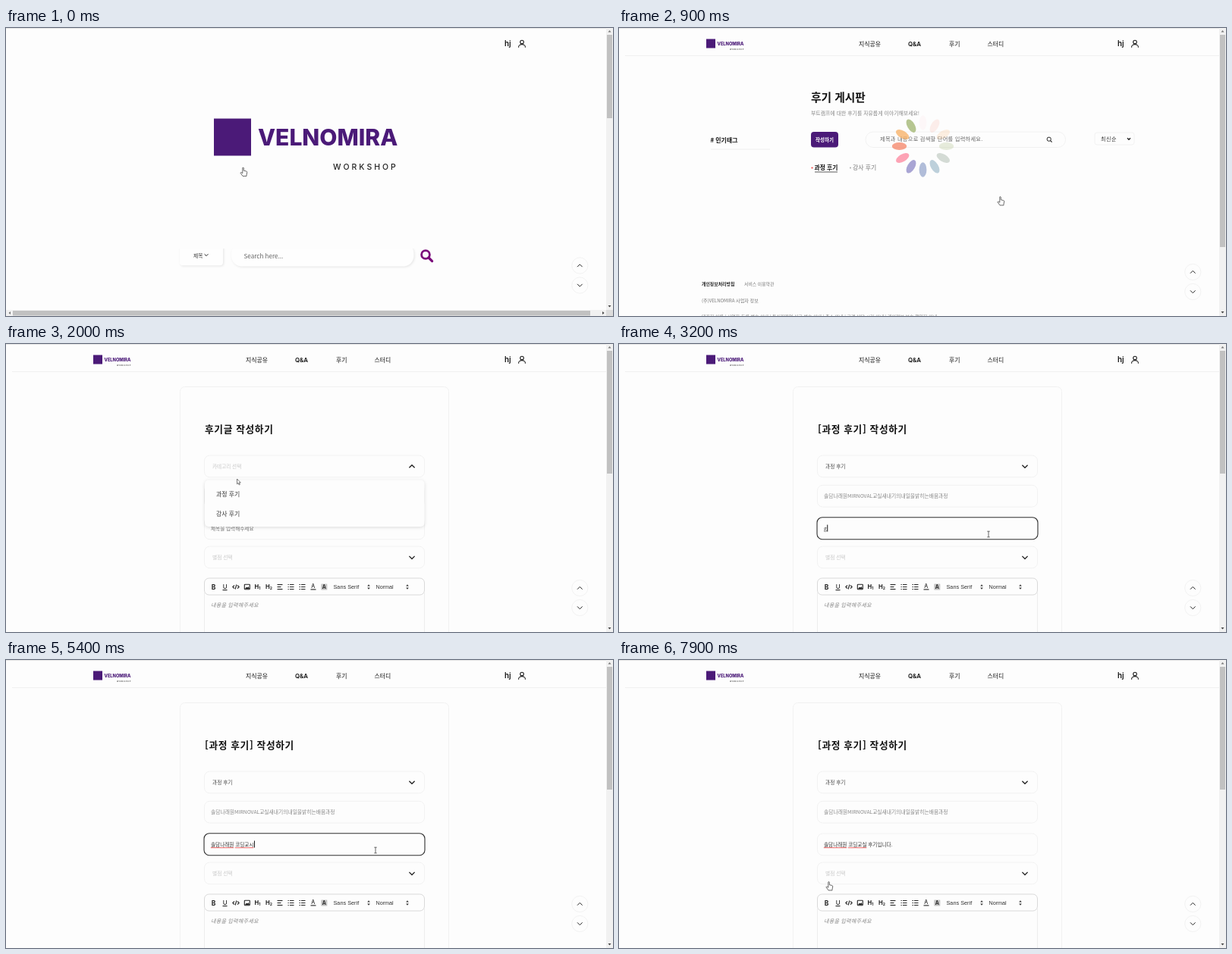
An HTML page for the animation above (8 s loop, 800 by 380 pixels).

```html
<!DOCTYPE html>
<html lang="ko">
<head>
<meta charset="utf-8">
<title>Review board</title>
<style>
html, body { margin: 0; width: 100%; height: 100%; overflow: hidden; background: #fdfdfd; }
svg { display: block; }
text { font-family: 'Noto Sans CJK KR', 'Noto Sans CJK', 'Noto Sans', sans-serif; white-space: pre; }
.latin { font-family: Inter, Roboto, sans-serif; }
.arial { font-family: 'Liberation Sans', Arial, sans-serif; }
.line { fill: none; stroke: #222; stroke-width: 1.1; }
.box { fill: #fdfdfd; stroke: #efefef; stroke-width: .8; }
.soft { fill: #fefefe; filter: drop-shadow(1px 1.5px 1.5px #00000018); }
.card { fill: #fdfdfd; stroke: #e8eef2; stroke-width: .8; filter: drop-shadow(0 1px 4px #b8d4e238); }
.wave { stroke: #e83030; stroke-width: 1; stroke-dasharray: 1.5 .5; }
</style>
</head>
<body>
<svg id="stage" width="800" height="380" viewBox="0 0 800 380"></svg>
<script>
const PURPLE = '#4b1a78', GREY = '#888', PALE = '#c8c8c8';
const BRAND = 'VELNOMIRA', TAG = 'WORKSHOP';
const COURSE = '솔담나래원MIRNOVAL교실새내기의내일을밝히는배움과정';
const TYPED = '솔담나래원 코딩교실 후기입니다.';
const PETALS = ['#fe718d', '#f47e60', '#f8b26a', '#abbd81', '#849b87', '#6492ac', '#637cb5', '#6a63b6'];

// Markup helpers
const text = (x, y, str, size, fill = '#222', weight = 400, extra = '') =>
  `<text x="${x}" y="${y}" font-size="${size}" fill="${fill}" font-weight="${weight}" ${extra}>${str}</text>`;
const rect = (x, y, w, h, r = 0, attrs = 'class="box"') =>
  `<rect x="${x}" y="${y}" width="${w}" height="${h}" rx="${r}" ${attrs}/>`;
const path = (d, attrs = 'class="line"') => `<path d="${d}" ${attrs}/>`;
const circle = (x, y, r, attrs = 'class="line"') => `<circle cx="${x}" cy="${y}" r="${r}" ${attrs}/>`;
const chevron = (x, y, w, dir, width = 1) =>
  path(`M${x - w} ${y - dir * w / 2}l${w} ${dir * w}l${w} ${-dir * w}`, `class="line" style="stroke-width:${width}"`);
const fill = color => `fill="${color}"`;
const latin = 'class="latin"', arial = 'class="arial"';
const spaced = n => `letter-spacing="${n}"`;

const account = text(657, 24, 'hj', 9.7, '#111', 600, latin) +
  circle(680, 18.6, 2.3) + path('M675.6 25.8v-.8a4.4 3.4 0 0 1 8.8 0v.8');

const pager = y => [[0, -1], [26, 1]].map(([dy, dir]) =>
  circle(756.3, y + dy, 10.6, 'class="box"') + chevron(756.3, y + dy, 3.3, dir)).join('');

const scrollbar = (height, thumb, id = '') =>
  rect(791, 0, 9, height, 0, fill('#f1f1f1')) +
  path('M793.5 5.5l2-2.5l2 2.5z', fill('#777')) +
  path(`M793.5 ${height - 6}l2 2.5l2 -2.5z`, fill('#444')) +
  rect(792, 9, 7, thumb, 0, fill('#c1c1c1') + id);

const topLine = path('M0 .5H800', 'stroke="#e6e6e6"');

const header = topLine + path('M8 36.5H791', 'stroke="#f0f0f0"') +
  rect(115, 14.5, 12, 12, 0, fill(PURPLE)) +
  text(129.5, 23, BRAND, 5.7, PURPLE, 800, latin) +
  text(146, 28.5, TAG, 2.4, '#333', 500, latin + spaced(.6)) +
  text(316, 24, '지식공유', 7.9, '#111', 500) +
  text(381, 24, 'Q&amp;A', 7.9, '#111', 600, latin) +
  text(435, 24, '후기', 7.9, '#111', 500) +
  text(485.5, 24, '스터디', 7.9, '#111', 500) + account;

// Landing page
const cardAt = (x, y, title, lines) => rect(x - 16.5, 457, 180, 200, 5, 'class="card"') +
  text(x, y, title, 11.9, '#111', 500) +
  lines.map((s, i) => text(x, y + 21.7 + i * 13.6, s, 9.95, GREY)).join('');

const bulb = path('M245 600v-12q0-5 6-5h7q2 4 6 5M259 590v-8h8M267 592h20l-3-9', 'class="line" style="stroke-width:1.8"') +
  circle(273, 581, 4.2, 'class="line" style="stroke-width:1.6"') +
  path('M273 573v2M266 576l2 1.5M280 576l-2 1.5M282 582h2M264 582h2M271 586v4h4v-4');
const star = x => path(`M${x} 583.5l1.4 2.8 3 .4-2.2 2.2.5 3-2.7-1.4-2.7 1.4.5-3-2.2-2.2 3-.4z`, fill('#111'));

const landing = `<g id="scroller">` +
  rect(274, 119.5, 49, 49, 0, fill(PURPLE)) +
  text(332, 155, BRAND, 30, PURPLE, 800, latin) +
  text(431, 187, TAG, 10.5, '#222', 500, latin + spaced(3)) +
  `<clipPath id="cut"><rect x="220" y="291" width="330" height="40"/></clipPath>
   <g clip-path="url(#cut)">${rect(229, 286, 57, 27.3, 4, 'class="soft"') + rect(297, 284, 240.5, 30.5, 14, 'class="soft"')}</g>` +
  text(247, 303, '제목', 6.7, '#333', 500) + chevron(264, 299.5, 2.4, 1) +
  text(313.5, 304, 'Search here...', 8.1, '#666') +
  circle(553, 299, 5.4, 'class="line" style="stroke:#7a0a7a;stroke-width:2.8"') +
  path('M557 303l4.6 4.6', 'stroke="#7a0a7a" stroke-width="3.2" stroke-linecap="round"') +
  cardAt(137.5, 529, '지식 공유 서비스', ['집단 지성이 참여하고', '토론할 수 있는 문화']) +
  cardAt(331, 522.3, '무엇이든 물어보세요', ['구성원이 서로 소통하며', '관심 분야에 대해', '자연스럽게 공유하는 환경 제공']) +
  cardAt(525, 522.3, '프로그램 참여 후기', ['실제 부트캠프에 참여한', '구성원들의 생생한 후기를', '공유하는 문화 형성']) +
  bulb + circle(459.5, 600, 18, 'class="line" style="stroke:#111;stroke-width:2.4"') +
  rect(637.5, 581.5, 36, 30, 1, 'class="line" style="stroke-width:1.6"') +
  [646, 655.5, 665].map(star).join('') + `</g>` +
  rect(0, 0, 791, 42, 0, fill('#fdfdfd')) + topLine + account + pager(313.5) +
  scrollbar(372, 110, 'id="thumb"') +
  rect(0, 372, 800, 8, 0, fill('#f1f1f1')) + rect(9, 373, 761, 6.5, 0, fill('#c1c1c1')) +
  path('M6 374l-2.5 2 2.5 2z', fill('#777')) + path('M786 374l2.5 2-2.5 2z', fill('#444')) +
  rect(791, 372, 9, 8, 0, fill('#dcdcdc'));

// Review board
const petals = Array.from({ length: 12 }, (_, k) =>
  `<ellipse class="petal" cy="-31" rx="4.9" ry="9.7" fill="${PETALS[k % 8]}" transform="rotate(${k * 30})"/>`).join('');

const board = header +
  text(253, 96.5, '후기 게시판', 14.7, '#111', 600) +
  text(253, 115, '부트캠프에 대한 후기를 자유롭게 이야기해보세요!', 6.9, GREY) +
  text(120.5, 150.5, '# 인기태그', 7.9, '#111', 600) + path('M121 160H199', 'stroke="#eee"') +
  rect(253, 137, 36, 20.5, 4, fill(PURPLE)) + text(259, 149.5, '작성하기', 6.5, '#fff', 600) +
  rect(325, 137, 263.5, 20.5, 10) +
  text(344, 149, '제목과 내용으로 검색할 단어를 입력하세요.', 7.2, '#666', 400, spaced(.28)) +
  circle(566.7, 146.7, 2.6, 'class="line" style="stroke-width:1"') + path('M568.6 148.6l2 2') +
  rect(627, 138, 52, 16, 3) + text(635, 148.7, '최신순', 7, '#333', 400, spaced(.6)) + chevron(672, 146.2, 2, 1, 1.4) +
  circle(254.5, 184.5, 1, fill('#e33')) + text(257.5, 187, '과정 후기', 7.8, '#111', 600) +
  path('M258 190H288', 'stroke="#333" stroke-width=".8"') +
  circle(305, 184.5, 1, fill('#aaa')) + text(308, 187, '강사 후기', 7.9, '#777') +
  text(109, 340, '개인정보처리방침', 5.9, '#222', 600) + text(165, 340, '서비스 이용약관', 5.85, '#777') +
  text(109, 362, `(주)${BRAND} 사업자 정보`, 6.1, '#777') +
  text(109, 383.3, '대표자 이름 | 사업자 등록 번호 안내 | 통신판매업 신고 번호 안내 | 주소 안내 | 고객 상담 시간 안내 | 개인정보 보호 책임자 안내', 5.95, GREY) +
  `<g transform="translate(400.5 156)">${petals}</g>` +
  pager(322) + scrollbar(380, 280);

// Writing form
const field = y => rect(261.5, y, 290, 28.7, 7);
const heading = str => text(262, 117, str, 12.7, '#111', 700, spaced(.65));
const sorter = x => path(`M${x - 1.8} 319.6l1.8-2.4 1.8 2.4zM${x - 1.8} 321.4l1.8 2.4 1.8-2.4z`, fill('#333'));
const rows = (x, lead) => [317.5, 320.5, 323.5].map((y, i) =>
  path(`M${x - 1.5} ${y}h${lead ? 5.5 : 5 + (i != 1) * 2}` + (lead ? `M${x - 4} ${y}h${lead}` : ''))).join('');

const toolbar = rect(261.5, 309, 290, 22, 6, 'fill="#fdfdfd" stroke="#d0d0d0" stroke-width=".8"') +
  text(270.8, 323.5, 'B', 8.5, '#222', 700, latin) +
  text(285.7, 322.7, 'U', 7.8, '#222', 500, latin) + path('M285.5 324.6h6') +
  path('M301 318.3l-2.2 2.2 2.2 2.2M305 318.3l2.2 2.2-2.2 2.2M303.8 317.5l-1.6 6') +
  rect(314.3, 317.2, 7, 6.5, .6, 'class="line"') + path('M315 323l2-2.5 1.2 1 1.3-1.5 1.5 3z', fill('#222')) +
  text(327.5, 323.2, 'H', 7.6, '#222', 700, latin) + text(333.2, 323.7, '1', 5, '#222', 700, latin) +
  text(342, 323.2, 'H', 7.6, '#222', 700, latin) + text(347.7, 323.7, '2', 5, '#222', 700, latin) +
  rows(359, 0) + rows(375.5, 1.3) + rows(390.5, 1.5) +
  text(402.2, 321.7, 'A', 7, '#222', 500, latin) + path('M401.5 323.9h7') +
  rect(415.3, 316.5, 8, 8, .5, fill('#c4c4c4')) + text(416.7, 323, 'A', 7, '#222', 600, latin) +
  text(431.5, 322.7, 'Sans Serif', 7.3, '#333', 400, arial) + sorter(478) +
  text(487.5, 322.7, 'Normal', 7.2, '#333', 400, arial) + sorter(529);

const form = header +
  rect(229.5, 56.5, 354, 340, 6) +
  field(147) + field(186.3) + field(229) + field(267) +
  `<g id="blank">${heading('후기글 작성하기') + text(272, 164, '카테고리 선택', 6.6, PALE)}</g>` +
  `<g id="chosen">${heading('[과정 후기] 작성하기') + text(272, 164, '과정 후기', 6.7, '#444') +
    text(270, 203, COURSE, 6.75, GREY)}</g>` +
  `<g id="closedMark">${chevron(535, 161.5, 3.6, 1, 1.3)}</g><g id="openMark">${chevron(535, 161.5, 3.6, -1, 1.3)}</g>` +
  text(272, 284.3, '별점 선택', 6.7, PALE) + chevron(535, 281.7, 3.6, 1, 1.3) +
  rect(261, 228.7, 291, 29, 7, 'id="focus" fill="none" stroke="#333" stroke-width="1.1"') +
  text(270, 245.5, '제목을 입력해주세요', 6.6, '#777', 400, 'id="hint"') +
  text(270, 245.5, '', 6.6, '#333', 400, 'id="typed"') +
  `<path id="waves" class="wave"/><path id="caret" stroke="#111"/>` +
  path('M261.5 328V380M551.5 328V380', 'stroke="#ededed"') + toolbar +
  text(270, 347.3, '내용을 입력해주세요', 7.1, GREY, 400, 'font-style="italic"' + spaced(.2)) +
  `<g id="menu">${rect(262, 179.5, 289.5, 61.5, 5, 'fill="#fdfdfd" style="filter:drop-shadow(0 1px 2px #0002)"') +
    text(277, 201, '과정 후기', 7.9, '#333') + text(277, 227, '강사 후기', 7.9, '#333')}</g>` +
  pager(322) + scrollbar(380, 162);

const pointers =
  `<g id="pointer"><path id="hand" d="M-.2 .4q1.2-.9 1.5.4v3.4l3.4.8q1.2.3 1 1.6l-.7 3.4v1.4h-5l-3-4.2q.5-1.4 1.8-.3l1 .8z" fill="#fff" stroke="#444" stroke-width=".8"/>
   <path id="arrow" d="M0 0v6.8l1.6-1.4 1.1 2.5 1.1-.5-1.1-2.4h2.1z" fill="#fff" stroke="#444" stroke-width=".7"/>
   <path id="beam" d="M-1.7-3.8h3.4M0-3.8v7.6M-1.7 3.8h3.4" stroke="#555" stroke-width=".9"/></g>`;

const stage = document.getElementById('stage');
stage.innerHTML = `<g id="landing">${landing}</g><g id="board">${board}</g><g id="form">${form}</g>${pointers}`;
const $ = id => document.getElementById(id);
const show = (id, on) => { $(id).style.display = on ? '' : 'none'; };
const place = (id, x, y) => $(id).setAttribute('transform', `translate(${x} ${y})`);

// Every intermediate state while composing Hangul: consonant, vowel, final
const INITIALS = 'ㄱㄲㄴㄷㄸㄹㅁㅂㅃㅅㅆㅇㅈㅉㅊㅋㅌㅍㅎ';
function keystrokes(str) {
  const states = [''];
  let done = '';
  for (const ch of str) {
    const n = ch.charCodeAt(0) - 0xAC00;
    if (n >= 0) {
      states.push(done + INITIALS[Math.floor(n / 588)]);
      if (n % 28) states.push(done + String.fromCharCode(0xAC00 + n - n % 28));
    }
    states.push(done += ch);
  }
  return states;
}
const states = keystrokes(TYPED);
const slip = ['g', 'gk', 'gks', 'gk', 'g'];

// Keys: [time, ...values, tag]
const moves = [
  [0, 312, 184, 'hand'], [100, 325, 186, 'arrow'], [400, 459, 195.5, 'arrow'], [600, 545, 262, 'hand'],
  [800, 545, 255, 'hand'], [900, 502, 222.5, 'hand'], [1200, 268, 146, 'hand'], [1500, 268, 146, 'arrow'],
  [1800, 302, 164, 'arrow'], [2000, 304.5, 178, 'arrow'], [2200, 292, 195, 'hand'], [2400, 292, 195, 'arrow'],
  [2800, 487, 251, 'beam'], [6900, 487, 251, 'arrow'], [7700, 300, 281, 'hand'], [7800, 278, 304, 'hand'],
  [7900, 276, 292.5, 'hand'], [8000, 276, 292.5, 'hand']];
const last = states.length - 1;
const typing = [[0, 0], [3800, 0], [4800, 14], [5000, 14], [5400, 23], [5500, 23], [6700, last], [8000, last]];

function at(keys, t) {
  const i = keys.findIndex(k => k[0] > t), a = keys[i - 1], b = keys[i];
  const f = (t - a[0]) / (b[0] - a[0]);
  return a.slice(1).map((v, j) => typeof v == 'number' ? v + (b[j + 1] - v) * f : v);
}

function drawTitle(t) {
  const slipped = slip[(t - 3200) / 100];
  const value = slipped || states[Math.round(at(typing, t)[0])];
  const el = $('typed');
  el.textContent = value;
  const width = value ? el.getComputedTextLength() : 0;
  const focused = t >= 3000 && t < 7800;
  show('focus', focused);
  show('hint', !value);
  show('caret', focused && (t < 6700 || (t - 6700) % 1000 < 500));
  $('caret').setAttribute('d', `M${271 + width} 238.5v9`);
  const wave = (from, count) => value.length >= from + count
    ? `M${270 + (from && el.getSubStringLength(0, from))} 247.7h${el.getSubStringLength(from, count)}` : '';
  $('waves').setAttribute('d', value.length > 5 ? wave(0, 5) + wave(6, 4) : '');
}

function frame() {
  const t = Math.floor(performance.now() % 8000 / 100) * 100;
  show('landing', t < 900);
  show('board', t >= 900 && t < 1500);
  show('form', t >= 1500);

  const p = Math.min(t / 400, 1), scroll = 218 * p * p * (3 - 2 * p);
  place('scroller', 0, -scroll);
  place('thumb', 0, scroll * 64 / 218);

  document.querySelectorAll('.petal').forEach((el, k) =>
    el.setAttribute('opacity', .9 * (1 - (t / 1000 + 1.05 - k / 12) % 1)));

  const open = t >= 1800 && t < 2400, picked = t >= 2400;
  for (const id of ['menu', 'openMark']) show(id, open);
  show('closedMark', !open);
  show('blank', !picked);
  show('chosen', picked);
  if (t >= 1500) drawTitle(t);

  const [x, y, kind] = at(moves, t);
  place('pointer', x, y);
  for (const id of ['hand', 'arrow', 'beam']) show(id, id == kind);
  requestAnimationFrame(frame);
}
frame();
</script>
</body>
</html>
```
